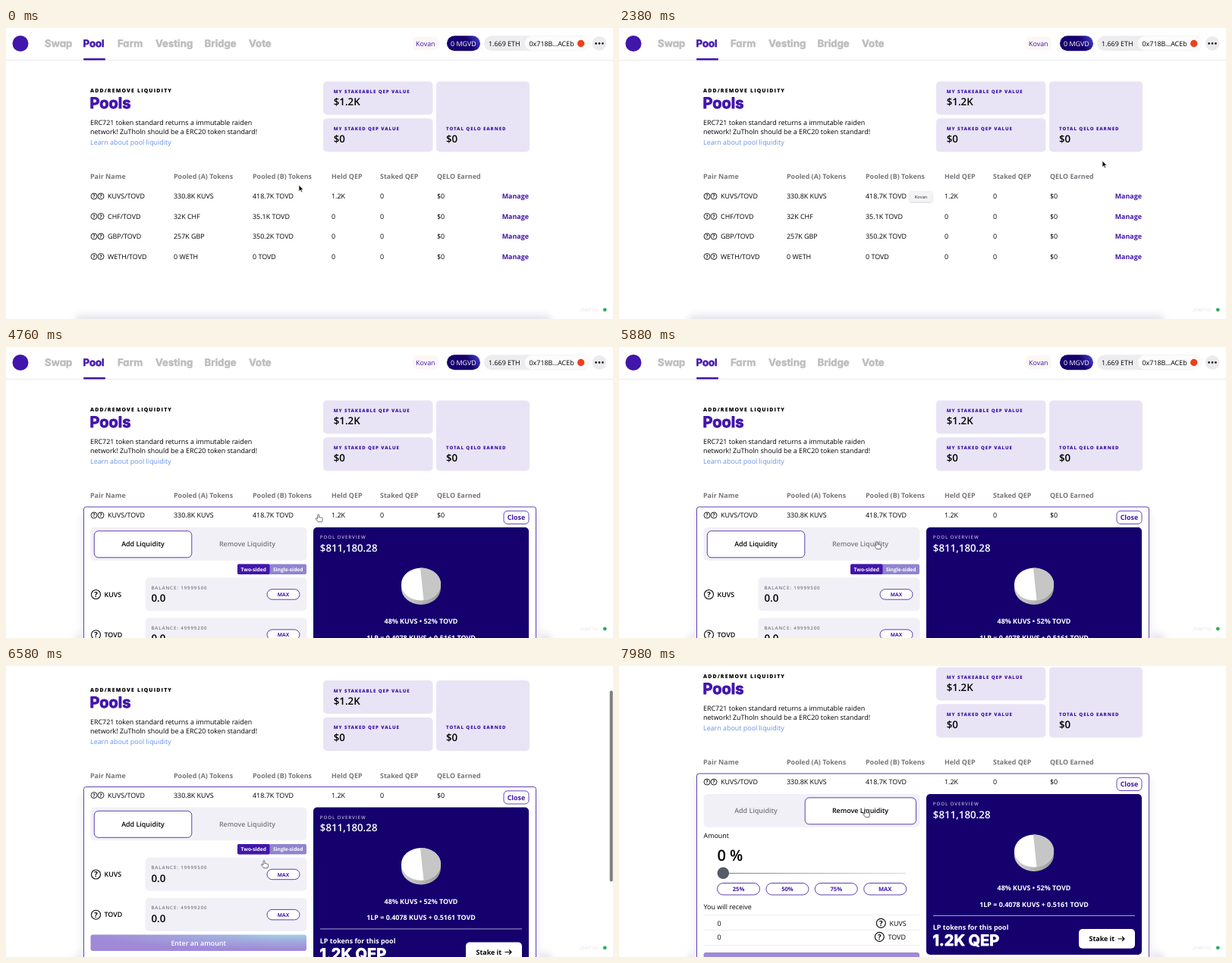
An HTML page for the animation above (8 s loop, 800x384 px).

```html
<!DOCTYPE html>
<html lang="en">
<head>
<meta charset="utf-8">
<title>Pools</title>
<style>
html, body { margin: 0; width: 100%; height: 100%; overflow: hidden; background: #fff; }
svg { display: block; width: 100%; height: 100%; }
text { font: 400 8.94px "Open Sans", "Noto Sans", sans-serif; fill: currentColor; color: #000; text-rendering: geometricPrecision; white-space: pre; }
.s { font-weight: 600; }
.b { font-weight: 700; }
.m { text-anchor: middle; }
.cap { font-size: 6.1px; font-weight: 800; letter-spacing: .15em; }
.cap.s { font-weight: 600; }
.cap.lead { font-size: 6.9px; letter-spacing: .17em; }
.big { font-size: 13.33px; font-weight: 600; }
.huge { font-size: 20px; font-weight: 600; }
.sm { font-size: 6.67px; font-weight: 700; }
.md { font-size: 7.6px; font-weight: 700; }
.fun { font: 700 13.2px Inter, sans-serif; font-feature-settings: "cv11"; stroke: currentColor; stroke-width: .5; stroke-linejoin: round; }
.fun.title { font-size: 20px; stroke-width: .9; }
.p { color: #4215ab; }
.w { color: #fff; }
.g { color: #77777c; }
.nav { color: #bdbdbd; }
.link { color: #6b93e6; }
.lilac { color: #b8b2da; }
.tip { font: 5.6px Inter, sans-serif; color: #333; }
.tiny { font-size: 5.6px; font-style: italic; color: #e0e0e0; }
.line { fill: #fff; stroke: #351399; stroke-width: .8; }
</style>
</head>
<body>
<svg id="stage" viewBox="0 0 800 384">
  <defs>
    <linearGradient id="pill" x2="1" y2="-.25">
      <stop offset=".5" stop-color="#15006d"/><stop offset=".8" stop-color="#3a2fb4"/><stop offset="1" stop-color="#6fc0d6"/>
    </linearGradient>
    <radialGradient id="action" cx=".92" cy="0" r=".9">
      <stop stop-color="#9ed6e4"/><stop offset=".35" stop-color="#a3b0df"/><stop offset="1" stop-color="#a08ad8"/>
    </radialGradient>
    <linearGradient id="rail" gradientUnits="userSpaceOnUse" x1="137" x2="380" y1="0" y2="0">
      <stop stop-color="#777b88"/><stop offset="1" stop-color="#dcdce2"/>
    </linearGradient>
    <linearGradient id="side"><stop stop-color="#d2d2d2"/><stop offset="1" stop-color="#999"/></linearGradient>
    <filter id="soft" x="-10%" y="-60%" width="120%" height="220%"><feGaussianBlur stdDeviation="5"/></filter>
    <filter id="shade"><feDropShadow dx="0" dy=".6" stdDeviation="1" flood-opacity=".3"/></filter>
  </defs>
</svg>
<script>
const LOOP = 8000, STEP = 70;
const PURPLE = '#4215ab', NAVY = '#15006d', CARD = '#e8e4f5', PALE = '#f2f0f7';

const text = (x, y, str, cls = '') => `<text x="${x}" y="${y}" class="${cls}">${str}</text>`;
const box = (x, y, w, h, r, fill, extra = '') =>
  `<rect x="${x}" y="${y}" width="${w}" height="${h}" rx="${r}" fill="${fill}" ${extra}/>`;
const outline = (x, y, w, h, r) => box(x, y, w, h, r, '#fff', 'class="line"');
const dot = (x, y, r, fill, extra = '') => `<circle cx="${x}" cy="${y}" r="${r}" fill="${fill}" ${extra}/>`;
const path = (d, attrs) => `<path d="${d}" ${attrs}/>`;
const group = (id, ...parts) => `<g id="${id}">${parts.join('')}</g>`;
const coin = (x, y, r) => dot(x, y, r, '#fff', `stroke="#111" stroke-width="${.4 + r / 8}"`) +
  `<text x="${x}" y="${y + r * .58}" class="m b" style="font-size:${r * 1.6}px">?</text>`;
const pillButton = (x, y, w, h, label, cls) =>
  outline(x, y, w, h, h / 2) + text(x + w / 2, y + h / 2 + 2.6, label, `m p ${cls}`);

const header = () => {
  const nav = [[51, 'Swap'], [101.5, 'Pool'], [147, 'Farm'], [197, 'Vesting'], [261.5, 'Bridge'], [320, 'Vote']];
  return box(0, 42, 800, .8, 0, '#e6e6e8') + dot(19, 20.5, 10.5, PURPLE) +
    nav.map(([x, s]) => text(x, 24.8, s, 'fun ' + (s === 'Pool' ? 'p' : 'nav'))).join('') +
    box(102, 40, 29, 2.4, 1, PURPLE) +
    box(536, 11, 34, 18.5, 6, '#fcf7f5') + text(540, 23.5, 'Kovan', 'p') +
    box(581, 10.3, 44, 20, 10, 'url(#pill)') + text(586, 23.5, '0 MGVD', 'w') +
    box(630, 10.3, 138, 20, 10, '#ededf0') + text(636, 23.5, '1.669 ETH') +
    box(684, 10.8, 83.5, 19, 9.5, '#fcfcfd') + text(689.5, 23.5, '0x718B...ACEb') +
    dot(757.7, 20.5, 4.7, '#ee3f1d') + dot(782, 20.4, 9.4, '#ebebee') +
    [777.6, 782, 786.4].map(x => dot(x, 20.4, 1.3, '#111')).join('');
};

const hero = () =>
  text(111, 85, 'ADD/REMOVE LIQUIDITY', 'cap lead') + text(110.5, 106, 'Pools', 'fun title p') +
  text(111, 128.2, 'ERC721 token standard returns a immutable raiden') +
  text(111, 140.4, 'network! ZuTholn should be a ERC20 token standard!') +
  text(111, 154.4, 'Learn about pool liquidity', 'link') +
  box(418, 70.5, 144.5, 44, 5, CARD) + box(418, 119.3, 144.5, 44.2, 5, CARD) + box(567, 70.5, 123, 93, 5, CARD) +
  text(431.7, 86, 'MY STAKEABLE QEP VALUE', 'cap p') + text(431.7, 102, '$1.2K', 'big') +
  text(431.7, 134.6, 'MY STAKED QEP VALUE', 'cap p') + text(431.7, 150.8, '$0', 'big') +
  text(580, 134.6, 'TOTAL QELO EARNED', 'cap p') + text(580, 150.8, '$0', 'big');

const columns = [134, 221, 325, 429, 493, 568];
const row = (y, cells) => coin(116, y - 3.3, 4) + coin(125, y - 3.3, 4) +
  cells.map((s, i) => text(columns[i], y, s)).join('');
const manage = y => text(653.7, y, 'Manage', 'b p');

const heads = () => ['Pair Name', 'Pooled (A) Tokens', 'Pooled (B) Tokens', 'Held QEP', 'Staked QEP', 'QELO Earned']
  .map((s, i) => text(i ? columns[i] : 111, 199.3, s, 'b g')).join('');

const closedRows = () => manage(225.3) + [
  ['CHF/TOVD', '32K CHF', '35.1K TOVD'],
  ['GBP/TOVD', '257K GBP', '350.2K TOVD'],
  ['WETH/TOVD', '0 WETH', '0 TOVD'],
].map((cells, i) => row(251.8 + i * 26.5, [...cells, '0', '0', '$0']) + manage(251.8 + i * 26.5)).join('');

const field = (y, name, balance) =>
  coin(118.5, y + 22.3, 6) + text(129.5, y + 25.5, name, 's') + box(183.5, y, 213, 44, 5, PALE) +
  text(191.5, y + 15.5, 'BALANCE: ' + balance, 'cap s g') + text(191.5, y + 32, '0.0', 'big') +
  pillButton(344, y + 15.5, 43, 13.5, 'MAX', 'sm');

const addForm = () =>
  outline(116.3, 242.8, 128.5, 35, 5.5) + text(180.5, 263.3, 'Add Liquidity', 'm s') +
  text(318, 263.3, 'Remove Liquidity', 'm s g') +
  box(305, 286.5, 91, 13.5, 2, '#9184cf') + box(305, 286.5, 42.5, 13.5, 2, PURPLE) +
  text(326.2, 295.6, 'Two-sided', 'm sm w') + text(371.7, 295.6, 'Single-sided', 'm sm w') +
  field(304.2, 'KUVS', '19999500') + field(357.4, 'TOVD', '49999200') +
  box(111.5, 406, 284.5, 21.5, 3, 'url(#action)') + text(253.7, 420, 'Enter an amount', 'm s w');

const removeForm = () =>
  outline(245.2, 242.8, 146.3, 35, 5.5) + text(318, 263.3, 'Remove Liquidity', 'm s') +
  text(180.5, 263.3, 'Add Liquidity', 'm s g') +
  text(111.5, 296, 'Amount') + text(129.5, 325.6, '0 %', 'huge') +
  box(137, 342, 241, 1, 0, 'url(#rail)') + dot(137.3, 342.3, 7.8, '#565a69') +
  ['25%', '50%', '75%', 'MAX'].map((s, i) => pillButton(129.5 + i * 64.4, 355.5, 56, 15.5, s, 'md')).join('') +
  text(111.5, 389.8, 'You will receive') +
  [397, 417, 437].map(y => box(111.5, y, 285, .7, 0, '#e6e4ee')).join('') +
  text(129.5, 411.5, '0') + coin(345.3, 408.3, 6) + text(356.5, 411.5, 'KUVS') +
  text(129.5, 429.5, '0') + coin(343.3, 426.3, 6) + text(354.5, 429.5, 'TOVD') +
  box(111.5, 447, 284.5, 21.5, 3, '#9f8ad4');

const pie = () =>
  path('M521 313v5a26 22 0 0 0 52 0v-5z', 'fill="url(#side)"') +
  '<ellipse cx="547" cy="313" rx="26" ry="21.5" fill="#fff"/>' +
  path('M546 291.5A26 21.5 0 0 1 550.5 334.3z', 'fill="#c6c6c6"');

const overview = () =>
  box(405, 238, 284, 212, 5, NAVY) + text(413.8, 253.3, 'POOL OVERVIEW', 'cap s lilac') +
  text(413.8, 269.6, '$811,180.28', 'big w') + pie() +
  text(547, 365.4, '48% KUVS • 52% TOVD', 'm b w') +
  text(547, 386.5, '1LP = 0.4078 KUVS + 0.5161 TOVD', 'm b w') +
  box(414, 398, 266, .9, 0, '#b9b3d8') + text(413.8, 417, 'LP tokens for this pool', 'b w') +
  text(413.5, 438.2, '1.2K QEP', 'fun title w') +
  box(606, 416, 74, 25.8, 5, '#fff') + text(619.5, 432.2, 'Stake it', 'b') +
  path('M657.5 429h8.5m-3-3l3 3l-3 3', 'fill="none" stroke="#000" stroke-width="1.2"');

const openRow = () =>
  box(98, 218, 605, 300, 8, '#f4f3f8', 'filter="url(#soft)"') + outline(102.5, 211, 596, 300, 3) +
  box(656, 216.3, 33, 17.2, 5, '#fff', `id="close" stroke="${PURPLE}" stroke-width=".8"`) +
  text(672.5, 228.1, 'Close', 'm b p') +
  box(111.5, 238, 285, 43.7, 5, PALE) + overview() + group('add', addForm()) + group('remove', removeForm());

const arrow = () => path('M0 0v8.2l1.9-1.7 1.3 3 1.4-.6-1.3-2.9h2.6z',
  'fill="#000" stroke="#fff" stroke-width=".7" stroke-linejoin="round"');
const hand = () => path('M-1 .8q1-1.5 2 0v3.3q1.2-.7 1.6.2 1.1-.5 1.5.4 1.4-.3 1.4.9v2.2L4.6 10H-.4L-3.4 6q-.2-1.4 1.2-1L-1 6z',
  'fill="#fff" stroke="#333" stroke-width=".7" stroke-linejoin="round"');

const stage = document.getElementById('stage');
stage.innerHTML += box(90, 378, 630, 30, 10, '#e6e4ec', 'filter="url(#soft)"') +
  group('page', header(), hero(), heads(), group('closed', closedRows()), group('open', openRow()),
    row(225.3, ['KUVS/TOVD', '330.8K KUVS', '418.7K TOVD', '1.2K', '0', '$0'])) +
  text(756, 374.3, '25967152', 'tiny') + dot(789.3, 371.8, 2.4, '#27ae60') +
  group('tooltip', box(383.5, 216, 29, 13.5, 2, '#f4f4f6', 'filter="url(#shade)"'), text(398, 224.8, 'Kovan', 'tip m')) +
  box(795.7, -1, 4, 252, 2, '#7f7f7f', 'id="thumb"') +
  group('cursor', group('arrow', arrow()), group('hand', hand()));

const $ = id => document.getElementById(id);
const show = (id, on) => $(id).setAttribute('visibility', on ? 'inherit' : 'hidden');
const move = (id, x, y) => $(id).setAttribute('transform', `translate(${x} ${y})`);
const smooth = u => u * u * (3 - 2 * u);

// keys: [time, value, ...]; holds the first and last values outside the range
function track(keys, t, col = 1, ease = u => u) {
  const i = keys.findIndex(k => k[0] > t);
  if (i === 0) return keys[0][col];
  if (i < 0) return keys[keys.length - 1][col];
  const a = keys[i - 1], b = keys[i];
  return a[col] + (b[col] - a[col]) * ease((t - a[0]) / (b[0] - a[0]));
}

const pointer = [
  [1960, 386, 207.3], [2380, 637, 175.3], [2870, 662, 221.3], [4200, 662, 221.3], [4760, 411.7, 220.8],
  [5000, 411.7, 220.8], [5600, 340, 256.6], [7000, 340, 256.6], [7560, 325, 189.4],
];
const scroll = [[6160, 0], [6230, 4], [6300, 12], [6370, 21.6], [6580, 51.5], [6720, 62.5], [6900, 69]];

function draw(t) {
  const x = track(pointer, t, 1, smooth), y = track(pointer, t, 2, smooth), top = track(scroll, t);
  const open = t >= 3430, removing = t >= 7770, pointing = t >= 2800;
  const hover = x > 655 && y > 216;
  move('page', 0, -top);
  move('cursor', x, y);
  move('thumb', 0, top * .65);
  $('thumb').setAttribute('opacity', track([[7420, 1], [7630, 0]], t));
  $('close').setAttribute('fill', hover ? CARD : '#fff');
  $('close').setAttribute('stroke', hover ? CARD : PURPLE);
  show('closed', !open);
  show('open', open);
  show('add', !removing);
  show('remove', removing);
  show('arrow', !pointing);
  show('hand', pointing);
  show('tooltip', t >= 910 && t < 2590);
  show('thumb', t >= 6160);
}

const start = performance.now();
function frame() {
  const t = (performance.now() - start) % LOOP;
  draw(Math.floor(t / STEP) * STEP);
  requestAnimationFrame(frame);
}
frame();
</script>
</body>
</html>
```
